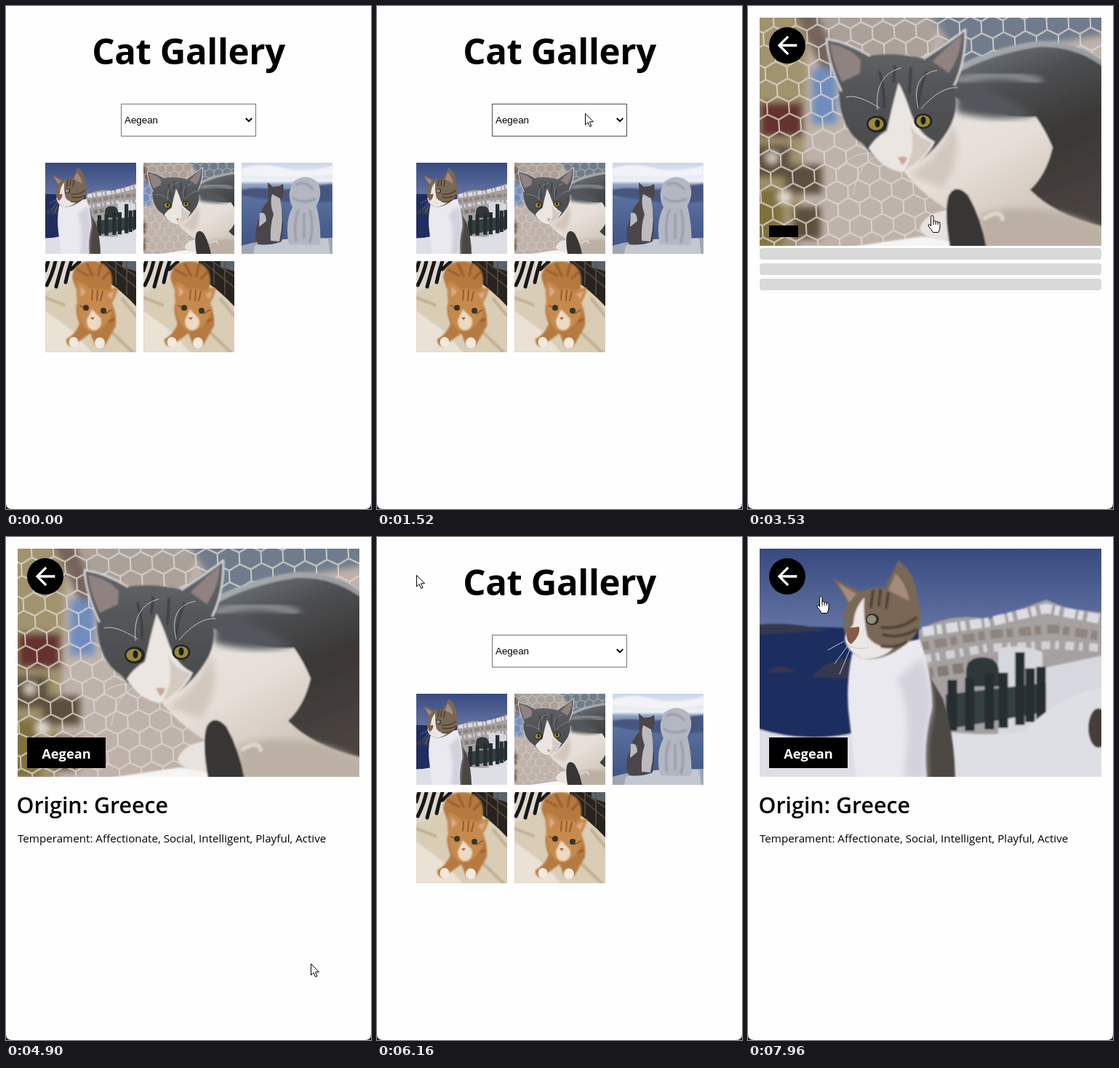
These frames come from a looping animation (502x690 px, 8 s). An HTML page:

```html
<!DOCTYPE html>
<html lang="en">
<head>
<meta charset="utf-8">
<title>Cat Gallery</title>
<style>
  html, body { margin: 0; height: 100%; overflow: hidden; background: #222; }
  #stage { display: block; width: 100vw; height: 100vh; }
  text { font-family: "Open Sans", "Noto Sans", sans-serif; }
  .select { font: 13.333px "Liberation Sans", Arial, sans-serif; }
  .line { fill: none; stroke-linecap: round; stroke-linejoin: round; }
</style>
</head>
<body>
<svg id="stage" viewBox="0 0 502 690">
<defs>
  <linearGradient id="sky" x2="0" y2="1">
    <stop stop-color="#384a80"/><stop offset=".36" stop-color="#6474a3"/>
  </linearGradient>
  <linearGradient id="fur" x2=".3" y2="1">
    <stop stop-color="#7b8187"/><stop offset=".3" stop-color="#4d5053"/><stop offset=".6" stop-color="#3a3735"/><stop offset="1" stop-color="#4a4340"/>
  </linearGradient>
  <linearGradient id="chest" x2=".8" y2="1">
    <stop stop-color="#ece7e3"/><stop offset=".45" stop-color="#e6ded7"/><stop offset="1" stop-color="#c3b7aa"/>
  </linearGradient>
  <linearGradient id="mask" x2="0" y2="1">
    <stop stop-color="#66696d"/><stop offset=".5" stop-color="#505255"/><stop offset="1" stop-color="#49494b"/>
  </linearGradient>
  <linearGradient id="bay" x2="0" y2="1">
    <stop stop-color="#c9d6ea"/><stop offset=".2" stop-color="#eef1f5"/><stop offset=".24" stop-color="#8fa3c6"/>
    <stop offset=".4" stop-color="#596f9d"/><stop offset="1" stop-color="#3d5182"/>
  </linearGradient>
  <pattern id="mesh" width="30" height="48" x="4" y="6" patternUnits="userSpaceOnUse" patternTransform="rotate(-3)">
    <path class="line" d="M15 0 0 8V24L15 32 30 24V8ZM15 32V48" stroke="#dcd6d1" stroke-width="2"/>
  </pattern>
  <filter id="soft"><feGaussianBlur stdDeviation="5"/></filter>
  <filter id="fine"><feGaussianBlur stdDeviation="1"/></filter>

  <!-- tabby on a wall by the sea -->
  <g id="tabby">
    <rect x="16" y="16" width="470" height="313" fill="url(#sky)"/>
    <g filter="url(#fine)">
      <path d="M10 121 250 128V290H10Z" fill="#1f2d60"/>
      <path d="M16 120Q60 116 110 128L16 134ZM88 192Q113 162 150 168V195ZM28 186Q43 170 65 185Z" fill="#343850"/>
      <path d="M235 128Q280 102 330 113L380 97 410 86 440 98 490 104V275H235Z" fill="#a6a1a1"/>
      <g class="line" style="stroke-linecap:butt">
        <path d="M240 130 330 117 410 98 486 113" stroke="#dcdce2" stroke-width="13" stroke-dasharray="16 4 7 6"/>
        <path d="M240 150 330 134 420 126 486 136" stroke="#8f847e" stroke-width="12" stroke-dasharray="9 8 17 5"/>
        <path d="M240 168 330 152 420 148 486 152" stroke="#d3d1d5" stroke-width="11" stroke-dasharray="12 7 5 9"/>
        <path d="M240 188 345 172" stroke="#847a75" stroke-width="14" stroke-dasharray="15 6"/>
      </g>
      <path d="M344 153Q375 145 405 158V180L490 162V290H344Z" fill="#d7d7df"/>
      <path d="M300 205V182Q302 165 322 165T345 182V205Z" fill="#2f3739"/>
      <path d="M272 216 410 200V240L272 264Z" fill="#364042"/>
      <path d="M281 196V266M305 193V266M332 187V264M351 186V262M374 158V258M388 180V254M403 178V250" fill="none" stroke="#252e31" stroke-width="13"/>
      <path d="M10 262Q80 285 150 268H280Q340 274 380 266 430 215 490 206V335H10Z" fill="#dedee5"/>
      <ellipse cx="482" cy="262" rx="14" ry="27" fill="#443c39"/>
    </g>
    <g filter="url(#fine)">
      <path d="M238 160Q248 190 268 222 284 270 285 332H225Z" fill="#4b4642"/>
      <path d="M143 160Q133 210 140 255L149 332H246Q240 285 253 235 254 190 236 140Z" fill="#e9e9ef"/>
      <path d="M205 195Q228 235 214 332H246Q240 285 253 235 252 195 238 165Z" fill="#d3d2db" filter="url(#soft)"/>
      <path d="M117 57 155 75Q170 68 188 70L207 32Q233 52 234 92 244 125 222 143 190 171 160 167 136 160 134 140L130 112Q137 95 136 88Z" fill="#796855"/>
      <path d="M203 50Q217 62 222 88L193 73ZM124 63 149 78 139 90Z" fill="#a58a7e"/>
      <path d="M160 83Q146 98 145 119L133 138Q134 158 160 167 185 168 200 152 175 152 164 136 158 110 160 83Z" fill="#ebe7e6"/>
      <path class="line" d="M172 74 169 96M182 73 180 94M193 77 190 97M184 124Q211 127 231 111M186 134Q208 140 232 127M184 150Q205 153 218 144" stroke="#4f4137" stroke-width="4"/>
    </g>
    <ellipse cx="171" cy="113" rx="9" ry="8" fill="#352d28"/><ellipse cx="170" cy="113" rx="6.5" ry="6" fill="#8f9078"/>
    <ellipse cx="135" cy="120" rx="4" ry="7" fill="#697266"/>
    <path d="M137 125 153 123Q155 135 142 147 133 143 137 125Z" fill="#865c47"/>
    <path class="line" d="M137 147Q148 156 166 152M138 148 119 174M142 150 126 188M132 143 110 155" stroke="#c9c4c8" stroke-width="1"/>
  </g>

  <!-- grey and white cat behind wire mesh -->
  <g id="grey">
    <rect x="16" y="16" width="470" height="313" fill="#bfb2aa"/>
    <g filter="url(#soft)">
      <path d="M0 0H85L70 345H0Z" fill="#a0936d"/>
      <path d="M75 0H270L240 95H110Z" fill="#aca199"/>
      <path d="M60 0 90 0 130 85 110 105Z" fill="#76645c"/>
      <path d="M245 0H500V38L350 62 300 90Z" fill="#707b8b"/>
      <path d="M16 132H75V180H16Z" fill="#65302f"/>
      <path d="M88 86H122V162H88Z" fill="#6f8dbf"/>
      <path d="M10 190H58V235H10ZM50 218H102V258H50ZM62 275H100V320H62Z" fill="#5d4f3e"/>
      <path d="M10 250H48V330H10Z" fill="#80703a"/>
      <circle cx="50" cy="262" r="9" fill="#e6dfd4"/><circle cx="33" cy="208" r="8" fill="#d9cfc0"/>
    </g>
    <rect x="16" y="16" width="470" height="313" fill="url(#mesh)" opacity=".85"/>
    <g filter="url(#fine)">
      <path d="M130 332 240 316 330 332Z" fill="#f6f5f4"/>
      <path d="M275 92Q330 58 400 48 455 48 490 77V332H310Z" fill="url(#fur)"/>
      <path d="M280 92Q330 62 400 52 450 51 488 78" class="line" stroke="#cdd1d4" stroke-width="8" opacity=".6"/>
      <path d="M290 104Q340 84 400 104" class="line" stroke="#9a9fa4" stroke-width="9" filter="url(#soft)"/>
      <path d="M205 212Q222 245 273 279L300 332H490V303Q420 286 388 252 410 232 419 194 409 170 396 152 340 155 285 125Z" fill="url(#chest)"/>
      <path d="M286 108Q330 105 394 150 340 160 287 146Z" fill="#53575b" filter="url(#soft)"/>
      <path d="M222 232Q268 205 280 160 300 200 268 250Z" fill="#d2c7be" filter="url(#soft)"/>
      <path d="M320 286Q400 262 490 308V335H320Z" fill="#bcb0a4" filter="url(#soft)"/>
      <path d="M276 280Q244 283 236 305 244 323 282 321Z" fill="#e9e3df"/>
      <path d="M278 332Q269 282 276 260 286 242 303 260 321 292 328 332Z" fill="#383635"/>
      <path class="line" d="M326 291Q347 278 350 292" stroke="#ddd4cb" stroke-width="6"/>
      <path d="M108 45Q140 50 168 68 203 63 241 72 272 49 299 32 301 75 283 110 292 145 274 172 252 208 212 228 178 217 159 190 126 170 125 115 110 75 108 45Z" fill="url(#mask)"/>
      <path d="M113 52Q138 56 155 74L154 92 129 104Q116 77 113 52ZM294 40Q277 52 254 76L276 92Q292 70 294 40Z" fill="#8f8280"/>
      <path class="line" d="M128 116Q109 75 108 45 138 50 167 68M242 72Q276 50 299 32 300 75 284 108" stroke="#dddbdc" stroke-width="2.5"/>
      <path d="M207 105Q198 138 191 171 175 180 166 195 184 224 212 228 246 212 257 186 235 176 224 147 216 122 207 105Z" fill="#ebe6e1"/>
      <path d="M222 160Q230 180 254 187 240 213 216 224 233 195 222 160Z" fill="#d5cac1"/>
      <path class="line" d="M181 91Q188 116 187 139M202 83 200 104M224 85 222 119M245 91Q234 120 234 138" stroke="#3d3e40" stroke-width="3.5"/>
      <path d="M206 208Q212 205 219 208 216 217 212 218Z" fill="#c9a79a"/>
    </g>
    <g fill="#252526"><ellipse cx="177" cy="162" rx="14" ry="11.5"/><ellipse cx="241" cy="158" rx="12.5" ry="10.5"/></g>
    <g fill="#9a8a38"><ellipse cx="176" cy="162" rx="10.5" ry="8.5"/><ellipse cx="241" cy="158" rx="9.5" ry="8"/></g>
    <g fill="#1d1c1a"><ellipse cx="178" cy="161" rx="3.5" ry="5.5"/><ellipse cx="241" cy="157" rx="3.5" ry="5.5"/></g>
    <path class="line" d="M178 142Q173 95 210 85M181 140Q150 120 135 125M234 140Q223 95 260 88M238 141Q265 110 288 112M172 202Q140 200 124 226M176 206Q150 220 145 258" stroke="#e3e1e0" stroke-width="1" opacity=".8"/>
  </g>

  <!-- cat beside a lion statue -->
  <g id="statue">
    <rect x="324" y="215" width="125" height="125" fill="url(#bay)"/>
    <path d="M324 223Q350 214 380 222T449 219V231Q400 238 324 232Z" fill="#f1f3f7" filter="url(#fine)"/>
    <path d="M324 252Q350 247 372 253L449 244V268Q400 274 324 260Z" fill="#46577f" filter="url(#fine)"/>
    <path d="M324 329Q350 319 449 318V340H324Z" fill="#9fa6b4"/>
    <path d="M342 329Q370 316 443 319L446 340H340Z" fill="#c3c7d0"/>
    <path d="M389 327Q383 296 394 276 385 258 395 241 412 228 428 241 437 256 427 274 434 303 432 328Z" fill="#b4b7c1"/>
    <path class="line" d="M399 245Q411 239 422 251M395 263Q405 272 425 265M402 280Q395 300 399 322M418 280Q424 303 418 324M410 285V318" stroke="#969bab" stroke-width="3" filter="url(#fine)"/>
    <path d="M360 242 367 248 376 247 381 244Q384 260 377 267 384 296 379 323 364 329 347 327 339 315 348 291 350 279 361 267Z" fill="#4a4649"/>
    <path d="M366 258 377 264Q383 293 376 323L364 322Q363 300 368 286 362 270 366 258ZM349 284Q358 281 358 295L348 303Z" fill="#bdbabf"/>
  </g>

  <!-- ginger kitten on a blanket -->
  <g id="ginger">
    <rect x="54" y="350" width="125" height="125" fill="#dacdb6"/>
    <path d="M54 418 92 446 118 475H54Z" fill="#eae2d4" filter="url(#fine)"/>
    <path d="M130 350H179V412Q158 389 130 371Z" fill="#28231f"/>
    <path d="M160 350H179V364L160 358Z" fill="#59636e"/>
    <path class="line" d="M136 351 179 386M148 350 179 371M151 350V382M166 350V396" stroke="#5b4e43" stroke-width="1.5"/>
    <path d="M54 350H107Q92 365 91 376L54 393Z" fill="#ddd8ce"/>
    <path class="line" d="M58 350 54 363M68 350Q64 368 56 383M79 350Q75 363 69 385M90 350Q85 364 82 379M101 351 90 361" stroke="#181615" stroke-width="5"/>
    <path class="line" d="M160 402 179 425M145 447 174 475M54 400 80 410" stroke="#bfae93" stroke-width="4" filter="url(#fine)"/>
    <g filter="url(#fine)">
      <path d="M91 373Q92 350 120 350 146 353 146 377L143 401Q153 421 151 439L137 464Q128 471 122 464L116 449 91 467Q82 466 83 457 96 450 101 436 92 413 101 401Z" fill="#b67a3f"/>
      <path class="line" d="M98 362 113 370M111 353 119 370M130 355 127 370M143 364 133 374M143 416 134 422M148 430 133 435" stroke="#945a2c" stroke-width="3"/>
      <path d="M98 378Q109 380 115 389 128 386 138 391 145 386 154 387 151 400 146 407 149 424 138 436 126 449 111 444 98 431 99 411 95 397 98 378Z" fill="#c68a4e"/>
      <path d="M102 384 110 392 103 399ZM149 391 145 402 139 396Z" fill="#dcaa88"/>
    </g>
    <path class="line" d="M119 390 118 403M126 390 125 404M133 392 130 404M102 411 109 415M145 417 137 422" stroke="#965c2e" stroke-width="2"/>
    <path d="M118 416 111 431Q111 445 123 445 134 440 130 428Z" fill="#ecdac3" filter="url(#fine)"/>
    <g fill="#363525"><circle cx="110" cy="414" r="4"/><circle cx="134" cy="418" r="4"/></g>
    <path d="M116 427H122L119 431Z" fill="#b46855"/>
    <g fill="#f2e9df"><ellipse cx="93" cy="461" rx="6.5" ry="7"/><ellipse cx="129" cy="462" rx="7" ry="7.5"/></g>
  </g>
</defs>

<path d="M0 0H502V682Q502 690 494 690H8Q0 690 0 682Z" fill="#fefefe"/>

<g id="gallery">
  <text x="251" y="80" text-anchor="middle" font-size="49.2" font-weight="700" letter-spacing="-.4">Cat Gallery</text>
  <rect id="select" x="158.5" y="134.5" width="185" height="44" fill="#fff" stroke="#767676"/>
  <text class="select" x="163" y="161">Aegean</text>
  <path d="M329.8 154 334 158.2 338.2 154" fill="none" stroke="#000" stroke-width="2"/>
  <svg x="54" y="215" width="125" height="125" viewBox="94.5 16 313 313"><use href="#tabby"/></svg>
  <svg x="189" y="215" width="125" height="125" viewBox="94.5 16 313 313"><use href="#grey"/></svg>
  <svg x="324" y="215" width="125" height="125" viewBox="324 215 125 125"><use href="#statue"/></svg>
  <svg x="54" y="350" width="125" height="125" viewBox="54 350 125 125"><use href="#ginger"/></svg>
  <svg x="189" y="350" width="125" height="125" viewBox="54 350 125 125"><use href="#ginger"/></svg>
  <g id="overlay" opacity=".8">
    <rect width="125" height="125" fill="#d3d3d3"/>
    <text x="62.5" y="70" text-anchor="middle" font-size="17.2">View Details</text>
  </g>
</g>

<g id="detail">
  <svg x="16" y="16" width="470" height="313" viewBox="16 16 470 313"><use id="photo"/></svg>
  <circle cx="54" cy="54" r="25"/>
  <path d="M20 11H7.83L13.42 5.41 12 4 4 12 12 20 13.41 18.59 7.83 13H20Z" transform="translate(34 34) scale(1.6667)" fill="#fff"/>
  <g id="loading">
    <rect x="29" y="301" width="40" height="16"/>
    <g fill="#d9d9d9">
      <rect x="16" y="332" width="470" height="16" rx="4"/>
      <rect x="16" y="353" width="470" height="16" rx="4"/>
      <rect x="16" y="374" width="470" height="16" rx="4"/>
    </g>
  </g>
  <g id="loaded">
    <rect x="29" y="275" width="108" height="42"/>
    <text x="83" y="304" text-anchor="middle" font-size="18.3" font-weight="700" fill="#fff">Aegean</text>
    <text x="14.5" y="379" font-size="30.4" font-weight="600">Origin: Greece</text>
    <text x="16" y="419" font-size="15.18">Temperament: Affectionate, Social, Intelligent, Playful, Active</text>
  </g>
</g>

<g id="pointer" fill="#fff" stroke="#000" stroke-linejoin="round">
  <circle id="click" r="12" fill="#e2dc3c" stroke="none" opacity=".9"/>
  <path id="arrow" d="M.5.5V16L4.1 12.7 6.7 18.5 9 17.4 6.5 11.8H11.5Z"/>
  <g id="hand" transform="translate(-6)">
    <path d="M4.6 15V2.2A1.7 1.7 0 0 1 8 2.2V8.5A1.6 1.6 0 0 1 11.1 8.8V9.6A1.6 1.6 0 0 1 14.2 10V10.8A1.4 1.4 0 0 1 17 11V16Q17 20 14.8 23.5H7.3Q5.5 20 1.2 15 .4 12.5 2.4 12.5 3.7 13 4.6 15Z"/>
    <path d="M8 8.5V13M11.1 9.5V13M14.2 10.5V13" fill="none"/>
  </g>
</g>
</svg>

<script>
const LOOP = 8000;
const $ = id => document.getElementById(id);
const show = (id, on) => $(id).style.display = on ? "" : "none";
const within = (t, spans) => spans.some(([from, to]) => t >= from && t < to);

// Pointer strokes: start, end, then a quadratic curve (from, control, to).
const strokes = [
  [510, 1060, 484, 674, 275, 300, 339, 181],
  [1360, 1520, 339, 181, 312, 164, 286, 147],
  [2210, 2600, 286, 147, 275, 215, 253, 287],
  [3680, 4150, 253, 287, 617, 240, 422, 593],
  [4900, 5490, 419, 585, 220, 300, 54, 52],
  [6560, 6950, 54, 52, 80, 160, 113, 271],
  [7550, 7960, 113, 271, 423, 707, 100, 81],
];
const clicks = [[3370, 3530], [6090, 6160], [7020, 7090]];
const details = [[3530, 6160], [7090, LOOP]];
const detailHands = [[3530, 3760], [5430, 6160], [7090, 7610], [7930, LOOP]];

function pointerAt(t) {
  const [start, end, x0, y0, cx, cy, x1, y1] = strokes.findLast(s => s[0] <= t) || strokes[0];
  const u = Math.min(1, Math.max(0, (t - start) / (end - start)));
  const s = u * u * (3 - 2 * u);
  const curve = (a, b, c) => a * (1 - s) ** 2 + 2 * b * s * (1 - s) + c * s * s;
  return [Math.round(curve(x0, cx, x1)), Math.round(curve(y0, cy, y1))];
}

function draw(now) {
  const t = now % LOOP;
  const [x, y] = pointerAt(t);
  const visible = t >= 510;
  const inDetail = within(t, details);
  const loading = t >= 3530 && t < 3680;
  const column = [54, 189, 324].find(left => x >= left && x < left + 125);
  const overCard = visible && !inDetail && column !== undefined && y >= 215 && y < 340;
  const overSelect = visible && x >= 158 && x < 344 && y >= 134 && y < 179;
  const hand = inDetail ? within(t, detailHands) : overCard;

  show("gallery", !inDetail);
  show("detail", inDetail);
  show("loading", loading);
  show("loaded", !loading);
  $("photo").setAttribute("href", t < 7090 ? "#grey" : "#tabby");
  $("select").setAttribute("stroke", overSelect ? "#4f4f4f" : "#767676");
  show("overlay", overCard);
  if (overCard) $("overlay").setAttribute("transform", `translate(${column} 215)`);

  show("pointer", visible);
  $("pointer").setAttribute("transform", `translate(${x} ${y})`);
  show("hand", hand);
  show("arrow", !hand);
  show("click", within(t, clicks));
}

const begin = performance.now();
(function frame() {
  draw(performance.now() - begin);
  requestAnimationFrame(frame);
})();
</script>
</body>
</html>
```
